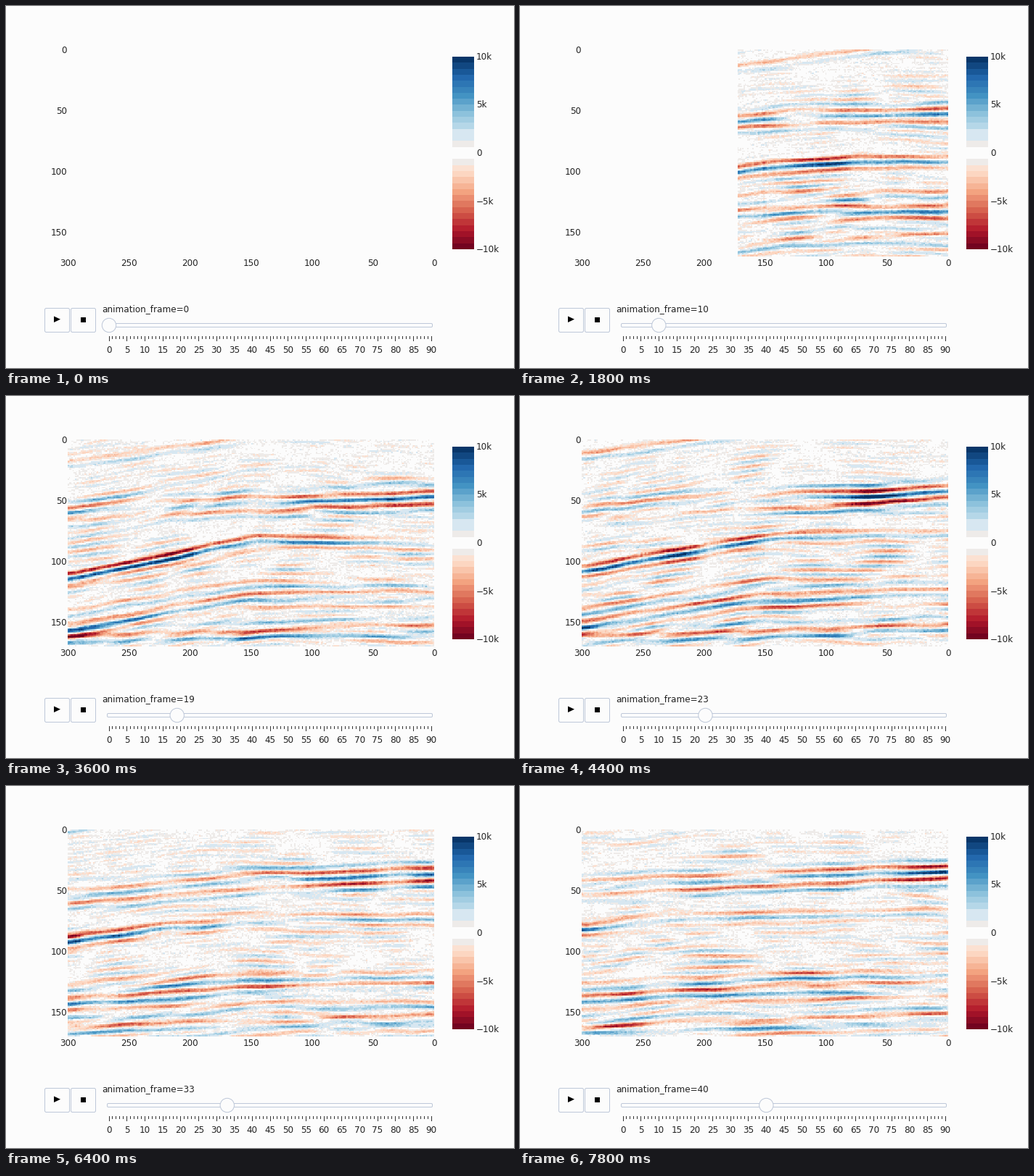
A matplotlib script for the animation above (8 s loop, 700 by 500 pixels).

```python
import numpy as np
import matplotlib.pyplot as plt
from matplotlib.animation import FuncAnimation
from matplotlib.colors import ListedColormap, to_rgba
from matplotlib.patches import Circle, FancyBboxPatch, Polygon, Rectangle

W, H, DPI = 700, 500, 100
PX = 72 / DPI
ROWS, COLS, STEPS = 170, 301, 40
BG, EDGE, INK = "#fcfcfc", "#bec8d9", "#222222"
BINS = 32

plt.rcParams["font.family"] = "DejaVu Sans"

# Stepped red-blue scale with a blank band around zero.
shades = plt.get_cmap("RdBu")((np.arange(BINS) + 0.5) / BINS)
shades[15:17] = to_rgba(BG)
shades[[14, 17]] = to_rgba("#eeebe9")
shades[18:20] = to_rgba("#d7e7f1")
cmap = ListedColormap(shades)

# ---- horizons ------------------------------------------------------------
xline = np.arange(COLS - 1, -1, -1.0)
row = np.arange(ROWS)[:, None]
KEYS = [6, 13, 19, 27, 33, 40]


def surface(*depths):
    """Depth by slice and crossline, from evenly spaced points per key slice."""
    depths = np.array(depths, float)
    cs = np.linspace(0, COLS - 1, depths.shape[1])
    lines = np.array([np.interp(xline, cs, d) for d in depths])
    ks = np.arange(STEPS + 1)
    grid = np.array([np.interp(ks, KEYS, col) for col in lines.T]).T
    padded = np.pad(grid, ((0, 0), (10, 10)), mode="edge")
    return sum(padded[:, i:i + COLS] for i in range(21)) / 21


upper = surface((52, 56, 68), (53, 57, 68), (47, 52, 60),
                (38, 48, 57), (36, 42, 54), (34, 39.5, 47))
middle = surface((95.5, 96, 103, 115, 128), (88, 88, 92.5, 105, 121),
                 (84.5, 84.5, 83.5, 99.5, 115), (73, 75, 80.5, 90, 102),
                 (73, 74, 75.5, 82, 92), (70, 70.5, 72, 74.5, 82))
deep = surface((118, 123, 133), (132, 134, 146), (125, 126, 150),
               (119, 125, 147), (126, 129, 137), (125, 128, 136))


def horizons(k):
    """Depth, strength and (offset, sign) stripes of each reflector package."""
    yield 11 * k, 0.13 * (xline - 11 * k + 36), 0.3, [(0, -1), (5, .7)]
    strength = 0.3 + 0.45 * np.interp(k, [6, 27], [.2, 1]) * np.exp(-(xline / 130) ** 2)
    yield 40, upper[k], strength, [(-10, .5), (-5, -.9), (0, 1), (5.5, -1), (11, .6)]
    strength = 0.25 + 0.8 / (1 + np.exp((20 + 6 * k - xline) / 50))
    yield 80, middle[k], strength, [(-4.5, -.8), (0, .9), (4.6, -.45)]
    yield 120, deep[k], 0.4, [(-11, -.6), (-5.5, .75), (0, -1), (5.5, 1), (11, -.6)]
    yield 160, 151 + xline / 30, 0.42, [(-6, .6), (0, -1), (5.5, .8)]


# ---- layered background --------------------------------------------------
SLICES, DEPTH, WIDTH = 48, 256, 320
rng = np.random.default_rng(11)


def texture(period, spread, fx, fk):
    """Random field with a given vertical period, smooth along x and slices."""
    spec = np.fft.rfftn(rng.standard_normal((SLICES, DEPTH, WIDTH)))
    k = np.fft.fftfreq(SLICES)[:, None, None]
    y = np.abs(np.fft.fftfreq(DEPTH))[None, :, None]
    x = np.fft.rfftfreq(WIDTH)[None, None, :]
    spec *= np.exp(-((y - 1 / period) / spread) ** 2 / 2
                   - (x / fx) ** 2 / 2 - (k / fk) ** 2 / 2)
    field = np.fft.irfftn(spec, s=(SLICES, DEPTH, WIDTH))[:, :, :COLS]
    return field / field.std()


beds = texture(7.8, .032, .013, .12)
grain = texture(4, .2, .3, .4)
level = np.interp(row, [0, 22, 40, 58, 68, 90, 169],
                  [.085, .095, .13, .13, .1, .14, .16])


def section(k):
    """Amplitudes of slice k, scaled to -1..1."""
    if k == 0:
        return np.zeros((ROWS, COLS))
    lift = max(0, KEYS[0] - k)
    pos = row - 0.8 * (middle[k] + lift)
    low = np.floor(pos).astype(int)
    frac, cols = pos - low, np.arange(COLS)
    amp = level * ((1 - frac) * beds[k, low % DEPTH, cols]
                   + frac * beds[k, (low + 1) % DEPTH, cols])
    amp += 0.04 * grain[k, :ROWS]

    for seed, depth, strength, stripes in horizons(k):
        ripple = beds[k, seed % DEPTH]
        gain = strength * (1 + 0.25 * ripple + 0.08 * grain[k, 200])
        for off, sign in stripes:
            dist = (row - depth - lift - off - 0.4 * ripple) / 1.8
            amp += sign * gain * np.exp(-dist ** 2)

    reach = 157 + 3.85 * (k - 6) if k < 17 else COLS
    return np.where(xline <= reach, amp, 0)


def to_bins(amp):
    return np.clip(np.floor((amp + 1) * BINS / 2), 0, BINS - 1)


# ---- stage ---------------------------------------------------------------
fig = plt.figure(figsize=(W / DPI, H / DPI), dpi=DPI, facecolor=BG)
ax = fig.add_axes([0, 0, 1, 1])
ax.axis("off")


def image(data, box):
    return ax.imshow(data, cmap=cmap, vmin=-.5, vmax=BINS - .5, extent=box,
                     aspect="auto", interpolation="nearest")


def label(x, y, s, ha="center"):
    return ax.text(x, y + 4, s, ha=ha, va="baseline", color=INK,
                   fontsize=12 * PX)


def rounded(x, y, w, h, r):
    ax.add_patch(FancyBboxPatch((x, y), w, h, fc=BG, ec=EDGE, lw=PX,
                                boxstyle=f"round,pad=0,rounding_size={r}"))


picture = image(to_bins(section(0)), (85, 590, 346, 60))
image(np.arange(BINS)[::-1, None], (615, 645, 336, 70))
ax.set(xlim=(0, W), ylim=(H, 0))

for v in range(0, 151, 50):
    label(84, 61 + 1.682 * v, str(v), "right")
for v in range(0, 301, 50):
    label(590 - 1.683 * v, 355, str(v))
for n, s in enumerate(["10k", "5k", "0", "\u22125k", "\u221210k"]):
    label(648, 70 + 66.5 * n, s, "left")

rounded(53.5, 417.5, 34, 33, 2)
rounded(89.5, 417.5, 34, 33, 2)
ax.add_patch(Polygon([(66, 428.5), (75, 432.7), (66, 437)], fc="black", lw=0))
ax.add_patch(Rectangle((102.5, 430), 7, 7, fc="black", lw=0))

rounded(139.5, 438.5, 448, 5, 1.5)
START, GAP = 142, 444 / 90
for v in range(91):
    x = START + GAP * v
    major = v % 5 == 0
    ax.plot([int(x) + .5] * 2, [456, 463 if major else 460], color="#333333",
            lw=PX, solid_capstyle="butt", snap=False)
    if major:
        label(x, 475, str(v))

knob = ax.add_patch(Circle((START, 441), 9.7, fc=BG, ec=EDGE, lw=PX, zorder=5))
caption = label(132, 417.6, "", "left")


def update(i):
    k = i + 1 if i else 0
    picture.set_data(to_bins(section(k)))
    knob.center = (START + GAP * k, 441)
    caption.set_text(f"animation_frame={k}")
    return picture, knob, caption


anim = FuncAnimation(fig, update, frames=STEPS, interval=200, repeat=True,
                     repeat_delay=0, init_func=lambda: update(0))
plt.show()
```
